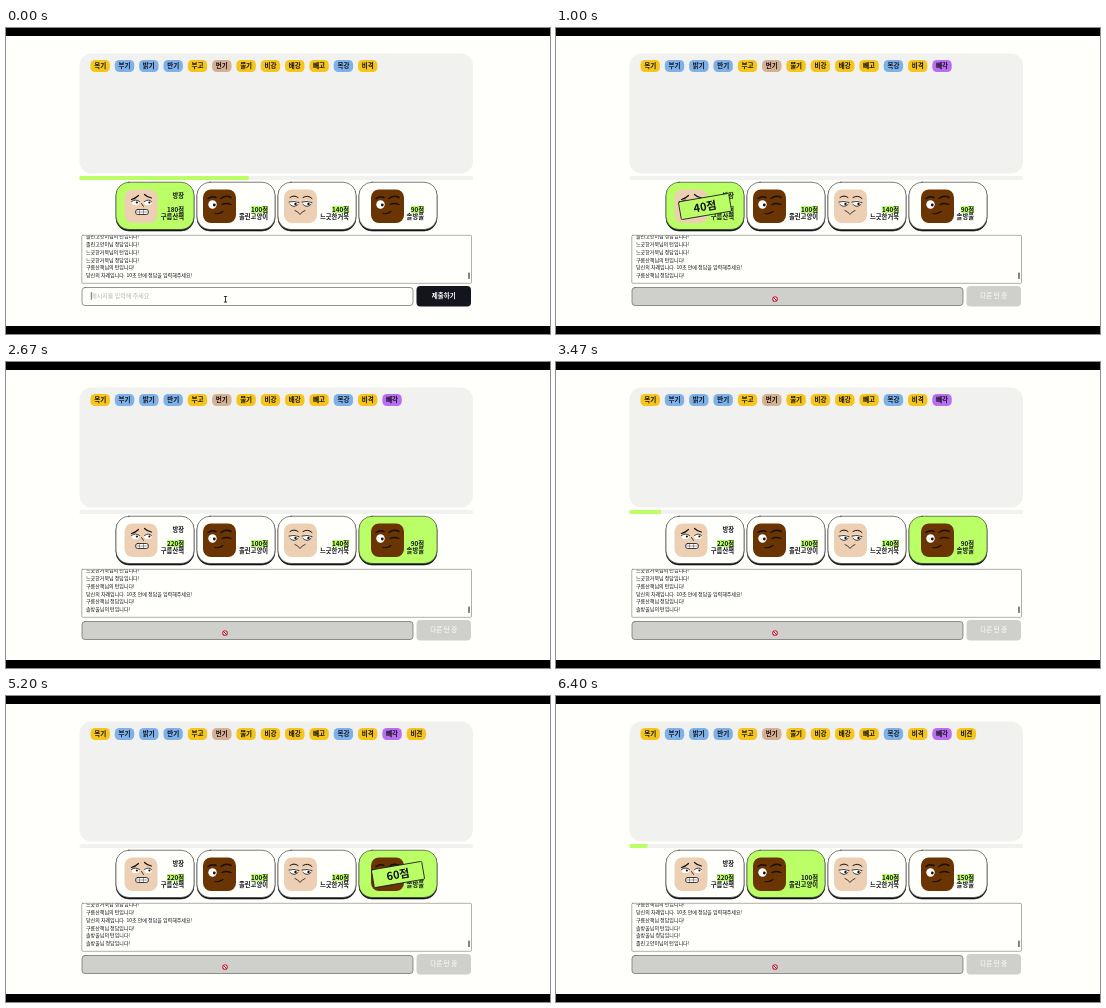
Write an HTML page with a canvas that moves like this. It is 544 by 306 pixels and loops after 6.47 s.

```html
<!DOCTYPE html>
<html lang="ko">
<meta charset="utf-8">
<style>
  html, body { margin: 0; width: 100%; height: 100%; overflow: hidden; background: #fffffb; }
  canvas { display: block; }
</style>
<canvas id="stage" width="544" height="306"></canvas>
<script>
const c = document.getElementById('stage').getContext('2d');
const LOOP = 6470, SUBMIT = 670, HIT = 800, TURN = 2670, HIT2 = 4000, TURN2 = 5870;
const LIME = '#bbff66', INK = '#111118', PANEL = '#f1f1ef', GRAY = '#cfcfcb', PAPER = '#fffffc';
const YELLOW = '#f6c51c', BLUE = '#7fb1e9', TAN = '#d5b093', PURPLE = '#b96df0';
const PEACH = '#edcfb3', BROWN = '#6b3403';

const tags = [
  ['목기', YELLOW], ['부기', BLUE], ['밝기', BLUE], ['반기', BLUE], ['부고', YELLOW],
  ['번기', TAN], ['물기', YELLOW], ['비강', YELLOW], ['배강', YELLOW], ['빼고', YELLOW],
  ['복강', BLUE], ['비격', YELLOW], ['빼각', PURPLE, SUBMIT], ['비견', YELLOW, HIT2]
];
const players = [
  { name: '구름산책', skin: PEACH, face: nervous, avatar: 8.5, right: 68, score: t => t < TURN ? 180 : 220 },
  { name: '졸린고양이', skin: BROWN, face: wink, avatar: 6, right: 71, score: () => 100 },
  { name: '느긋한거북', skin: PEACH, face: sly, avatar: 6, right: 71, score: () => 140 },
  { name: '솔방울', skin: BROWN, face: wink, avatar: 12, right: 65, score: t => t < TURN2 ? 90 : 150 }
];
const turn = i => players[i].name + '님의 턴입니다!';
const correct = i => players[i].name + '님 정답입니다!';
const log = [
  [turn(1)], [correct(1)], [turn(2)], [correct(2)], [turn(0)],
  ['당신의 차례입니다. 10초 안에 정답을 입력해주세요!'],
  [correct(0), SUBMIT], [turn(3), TURN], [correct(3), HIT2], [turn(1), TURN2]
];
const typing = [['', 0], ['ㅃ', 200], ['빼', 270], ['빽', 400], ['빼가', 470], ['빼각', 600]];

function box(x, y, w, h, r, fill, stroke, width = 0.6) {
  c.beginPath();
  c.roundRect(x, y, w, h, r);
  if (fill) { c.fillStyle = fill; c.fill(); }
  if (stroke) { c.strokeStyle = stroke; c.lineWidth = width; c.stroke(); }
}
function text(s, x, y, size, { color = INK, weight = 400, align = 'left' } = {}) {
  c.font = `${weight} ${size}px "Noto Sans CJK KR", "Noto Sans CJK", sans-serif`;
  c.textAlign = align;
  c.textBaseline = 'alphabetic';
  c.fillStyle = color;
  c.fillText(s, x, y + size * 0.37);
}
function dot(x, y, r, color, ry = r) {
  c.beginPath();
  c.ellipse(x, y, r, ry, 0, 0, 7);
  c.fillStyle = color;
  c.fill();
}
function line(d, width = 0.8, color = '#17100c') {
  c.strokeStyle = color;
  c.lineWidth = width;
  c.lineCap = 'round';
  c.stroke(new Path2D(d));
}

// Faces live in a 33 x 33 box.
function nervous() {
  for (const x of [11, 23.5]) {
    dot(x, 13, 3.8, '#fff', 2.6);
    dot(x + 1.4, 13, 1.1, INK);
  }
  line('M7 10Q11 9 14 6M20 5Q23 8 27 8.5', 1.2);
  line('M7 12Q11 9 15 12M20 12Q24 9 27 12M17 14L19 17');
  box(11, 20, 13, 5, 2.3, '#fff', INK, 0.8);
  line('M12 22.5H23M15 20.5V24.5M19 20.5V24.5', 0.4);
}
function wink() {
  dot(9.5, 15, 4.2, '#fff');
  dot(11.3, 15.5, 1.4, INK);
  line('M5 9Q9 6 13 8M18 9Q23 5 28 8', 1.5);
  line('M19 15Q23 13 28 15', 1.3);
  line('M12 24Q16 25 20 22', 1.2);
}
function sly() {
  for (const x of [10, 23]) {
    dot(x, 14, 4.2, '#fff', 3);
    dot(x + 1.5, 14.5, 1.2, INK);
    line(`M${x - 5} 12.5Q${x} 11 ${x + 5} 13M${x - 4} 15Q${x} 19 ${x + 4} 15`, 0.8);
  }
  line('M6 8Q10 5 14 8M19 8Q24 5 28 9', 1);
  line('M11 21Q14 22 16 25Q18 22 21 21', 0.8);
}

function stamp(label, x, age) {
  const p = Math.min(age / 200, 1), scale = 1 + 0.6 * (1 - p) ** 2;
  c.save();
  c.globalAlpha = 0.3 + 0.7 * p;
  c.translate(x, 178.5);
  c.rotate(-0.17);
  c.scale(scale, scale);
  box(-25.5, -9, 51, 18, 1, LIME, INK, 0.8);
  text(label, 0, 0, 11, { weight: 900, align: 'center' });
  c.restore();
}

function card(p, i, t, active) {
  const x = 110 + 81 * i, right = x + p.right, bold = { weight: 900, align: 'right' };
  box(x, 155, 78, 48, 13, INK, INK);
  box(x, 154.2, 78, 47.3, 13, active ? LIME : PAPER, '#333', 0.6);
  c.save();
  c.translate(x + p.avatar, 161.5);
  box(0, 0, 33, 33.5, 8, p.skin);
  p.face();
  c.restore();
  if (i === 0) text('방장', right, 168, 6.3, bold);
  const score = p.score(t) + '점';
  c.font = '900 6.3px "Noto Sans CJK KR", "Noto Sans CJK", sans-serif';
  const w = c.measureText(score).width;
  box(right - w, 178, w, 7, 0, LIME);
  text(score, right, 181.2, 6.3, bold);
  text(p.name, right, 188.2, 6.3, bold);
}

function progress(t) {
  if (t < HIT) return 0.43 + t / 10000;
  if (t >= TURN && t < HIT2) return (t - TURN) / 10000;
  return Math.max(0, t - TURN2 - 70) / 10000;
}

function chat(t) {
  box(75.8, 207.3, 389.7, 48, 1, PAPER, '#777', 0.6);
  c.save();
  c.beginPath();
  c.rect(76, 207.6, 389, 47);
  c.clip();
  const shown = log.filter(([, at = 0]) => t >= at).slice(-6);
  shown.forEach(([s], i) => text(s, 80, 247.3 - 7.8 * (5 - i), 5, { weight: 500 }));
  c.restore();
  box(462, 244.5, 2, 6.5, 0.5, '#858585');
}

function form(t) {
  const open = t < SUBMIT;
  box(76, 259.5, 331, 18, 3, open ? PAPER : GRAY, '#666', 0.7);
  box(410.5, 258, 54.5, 20.5, 4, open ? '#14141f' : GRAY);
  text(open ? '제출하기' : '다른 턴 중', 437.7, 268, 6.5, { color: '#fff', weight: open ? 700 : 500, align: 'center' });
  if (!open) {
    dot(219, 271, 3, '#fff');
    c.beginPath();
    c.arc(219, 271, 2.3, 0, 7);
    c.strokeStyle = '#b3182c';
    c.lineWidth = 1.1;
    c.stroke();
    line('M217.5 269.5L220.5 272.5', 1, '#b3182c');
    return;
  }
  const typed = typing.filter(([, at]) => t >= at).pop()[0];
  text(typed || '메시지를 입력해 주세요.', 85.3, 268, 6, { color: typed ? INK : '#b5b5b5' });
  const caret = 85.3 + (typed ? c.measureText(typed).width : 0);
  line(`M${caret} 264.5V271.5`, 0.6);
  line('M218.3 268.5H220.7M219.5 268.5V274M218.3 274H220.7', 0.8);
}

function draw(t) {
  c.fillStyle = '#fffffb';
  c.fillRect(0, 0, 544, 306);
  c.fillStyle = '#000';
  c.fillRect(0, 0, 544, 8);
  c.fillRect(0, 298, 544, 8);
  box(73.5, 25.5, 393.5, 120, 12, PANEL);
  tags.forEach(([word, color, at = 0], i) => {
    if (t < at) return;
    const x = 94.2 + 24.32 * i;
    box(x - 9.7, 32, 19.4, 12, 4.5, color);
    text(word, x, 38, 6.5, { weight: 900, align: 'center' });
  });
  box(73.5, 148, 393.5, 4, 1.5, PANEL);
  const bar = 393.5 * progress(t);
  if (bar > 0) box(73.5, 148, bar, 4, 1, LIME);
  const active = t < TURN ? 0 : t < TURN2 ? 3 : 1;
  players.forEach((p, i) => card(p, i, t, i === active));
  if (t >= HIT && t < TURN) stamp('40점', 149, t - HIT);
  if (t >= HIT2 && t < TURN2) stamp('60점', 392, t - HIT2);
  chat(t);
  form(t);
}

const start = performance.now();
function frame() {
  draw((performance.now() - start) % LOOP);
  requestAnimationFrame(frame);
}
frame();
</script>
</html>
```
